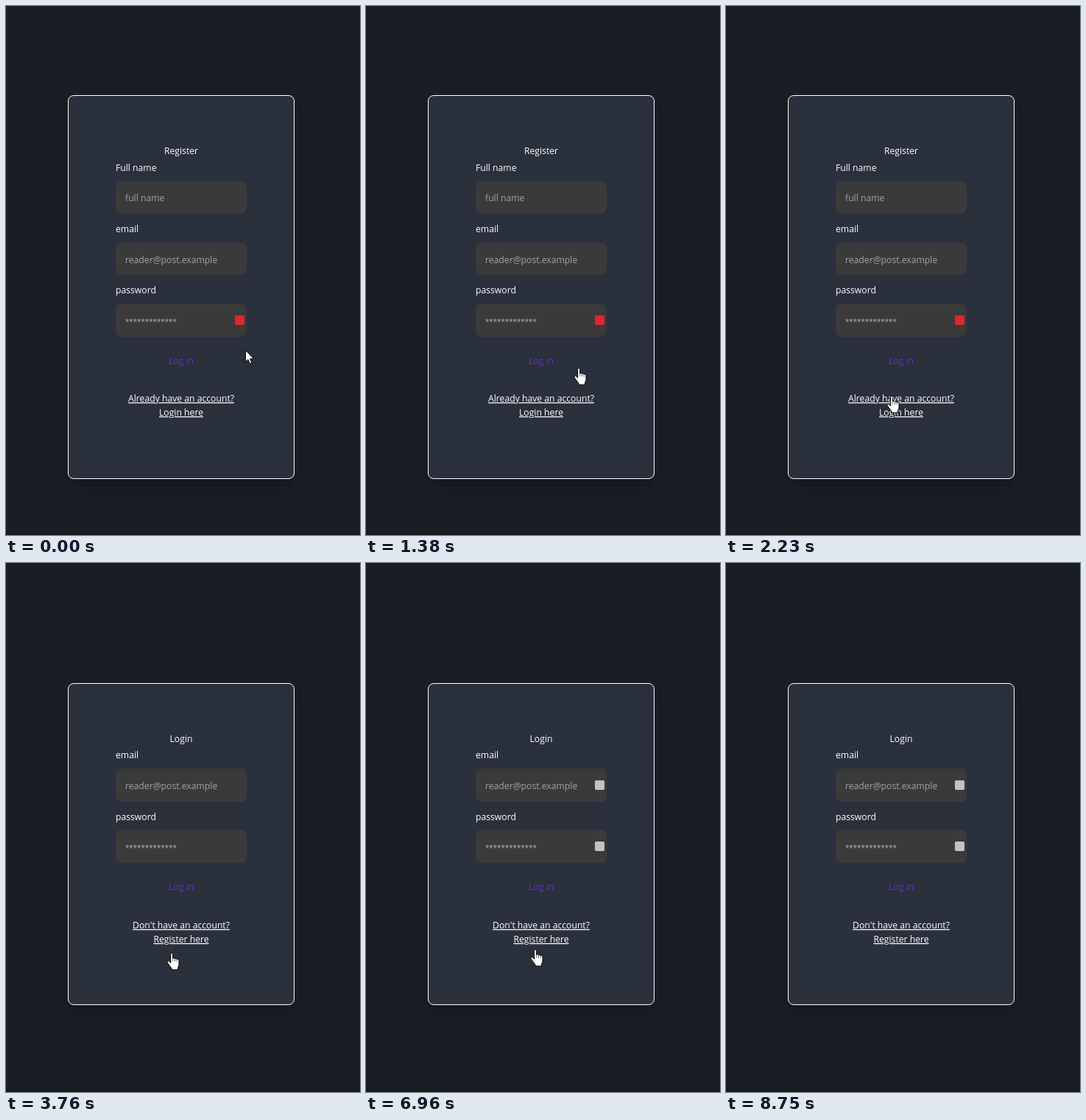
An HTML page that plays this animation: 481x718 px, repeating every 10 s.

```html
<!DOCTYPE html>
<html lang="en">
<head>
<meta charset="utf-8">
<title>Register and login</title>
<style>
  html, body { margin: 0; width: 100%; height: 100%; overflow: hidden; background: #191d24; }
  .strip { position: absolute; left: 0; top: 714px; width: 481px; height: 4px; background: #18191d; }
  .card {
    position: absolute; left: 84px; width: 308px; box-sizing: border-box;
    background: #2a303c; border: 1px solid #fff; border-radius: 8px;
    box-shadow: 0 20px 25px -5px rgba(0, 0, 0, .1), 0 8px 10px -6px rgba(0, 0, 0, .1);
  }
  svg { position: absolute; left: 0; top: 0; }
  text { font: 12.2px "Open Sans", "Noto Sans", sans-serif; fill: #fff; white-space: pre; }
  .mid { text-anchor: middle; }
  .hint { fill: #9ca3af; }
  .stars { font: 13.8px "Liberation Sans", sans-serif; }
  .button { fill: #6d28d9; }
  .link { text-decoration: underline; }
  .field { fill: #3a3a3a; }
  .cursor path { stroke: #000; stroke-linejoin: round; stroke-linecap: round; }
</style>
</head>
<body>
<div class="strip"></div>
<div id="register"></div>
<div id="login"></div>
<svg class="cursor" width="481" height="718">
  <g id="arrow">
    <path fill="#fff" d="M.5 .5V16L4 12.8 6.5 18.5 9 17.4 6.6 11.8H11.5Z"/>
  </g>
  <g id="hand">
    <path fill="#fff" d="M5.5 2.5c0-2.4 3.2-2.4 3.2 0v5.2c.6-1 2.6-.8 2.8.5 .8-.8 2.4-.4 2.6.7 .9-.6 2.9 0 2.9 1.6v5.5c0 2-1.5 3.3-1.5 4.5v2.5H7v-2C5.5 19 3 16 1.2 13.2c-1-1.7.8-3 2.2-1.8l2.1 2.2z"/>
    <path fill="none" stroke-width=".6" d="M8.7 7.7v3.6M11.5 8.2v3.4M14.1 9v3"/>
  </g>
</svg>
<script>
const LOOP = 10000, SWITCH = 3760, ICONS = 4040;
const $ = id => document.getElementById(id);

const label = (x, y, words, kind = '') => `<text x="${x}" y="${y}" class="${kind}">${words}</text>`;
const centred = (y, words, kind = '') => label(238, y, words, 'mid ' + kind);
const field = (y, h) => `<rect class="field" x="149" y="${y}" width="178" height="${h}" rx="8"/>`;
const icon = (y, color) => `<rect class="icon" x="311" y="${y}" width="13" height="13" rx="2" fill="${color}"/>`;
const card = (top, height, body) =>
  `<div class="card" style="top:${top}px;height:${height}px"></div>
   <svg width="481" height="718">${body.join('')}</svg>`;

const MAIL = 'reader@post.example';
const STARS = '*'.repeat(13);

$('register').innerHTML = card(121, 521, [
  centred(201, 'Register'),
  label(149, 224, 'Full name'), field(238, 44), label(162, 265, 'full name', 'hint'),
  label(149, 307, 'email'), field(321, 44), label(162, 349, MAIL, 'hint'),
  label(149, 390, 'password'), field(404, 45), label(162, 434, STARS, 'hint stars'),
  icon(420, '#e0252f'),
  centred(486, 'Log in', 'button'),
  centred(537, 'Already have an account?', 'link'),
  centred(556, 'Login here', 'link')
]);

$('login').innerHTML = card(163, 437, [
  centred(243, 'Login'),
  label(149, 265, 'email'), field(279, 45), label(162, 307, MAIL, 'hint'),
  label(149, 349, 'password'), field(362, 45), label(162, 392, STARS, 'hint stars'),
  icon(295, '#c2c2c2'), icon(378, '#c2c2c2'),
  centred(444, 'Log in', 'button'),
  centred(496, "Don't have an account?", 'link'),
  centred(515, 'Register here', 'link')
]);

// Start time, cursor shape, left, top
const steps = [
  [0, 'arrow', 325, 467],
  [130, 'hand', 297, 481],
  [280, 'hand', 290, 486],
  [410, 'hand', 285, 489],
  [1380, 'hand', 282, 491],
  [1530, 'hand', 279, 493],
  [1650, 'hand', 271, 497],
  [1800, 'hand', 260, 504],
  [1930, 'hand', 241, 512],
  [2090, 'hand', 228, 521],
  [2230, 'hand', 218, 529],
  [5570, 'hand', 217, 529],
  [6260, 'hand', 219, 528],
  [6380, 'hand', 221, 526],
  [6530, 'hand', 222, 524],
  [6960, 'hand', 223, 524],
  [7210, 'hand', 239, 528],
  [7360, 'arrow', 277, 541],
  [7510, 'arrow', 297, 548],
  [7630, 'arrow', 315, 555],
  [7790, 'arrow', 332, 566],
  [7930, 'arrow', 350, 582],
  [8050, 'arrow', 372, 604],
  [8200, 'arrow', 393, 636],
  [8330, 'arrow', 415, 671],
  [8470, 'arrow', 420, 683],
  [8600, 'arrow', 421, 693],
  [8750, 'none', 0, 0]
];

const loginIcons = $('login').querySelectorAll('.icon');
const show = (el, on) => { el.style.display = on ? '' : 'none'; };

function draw(t) {
  show($('register'), t < SWITCH);
  show($('login'), t >= SWITCH);
  loginIcons.forEach(el => show(el, t >= ICONS));

  const [, shape, x, y] = steps.findLast(step => step[0] <= t);
  for (const id of ['arrow', 'hand']) {
    show($(id), id === shape);
    $(id).setAttribute('transform', `translate(${x} ${y})`);
  }
}

const start = performance.now();
function tick() {
  draw((performance.now() - start) % LOOP);
  requestAnimationFrame(tick);
}
tick();
</script>
</body>
</html>
```
